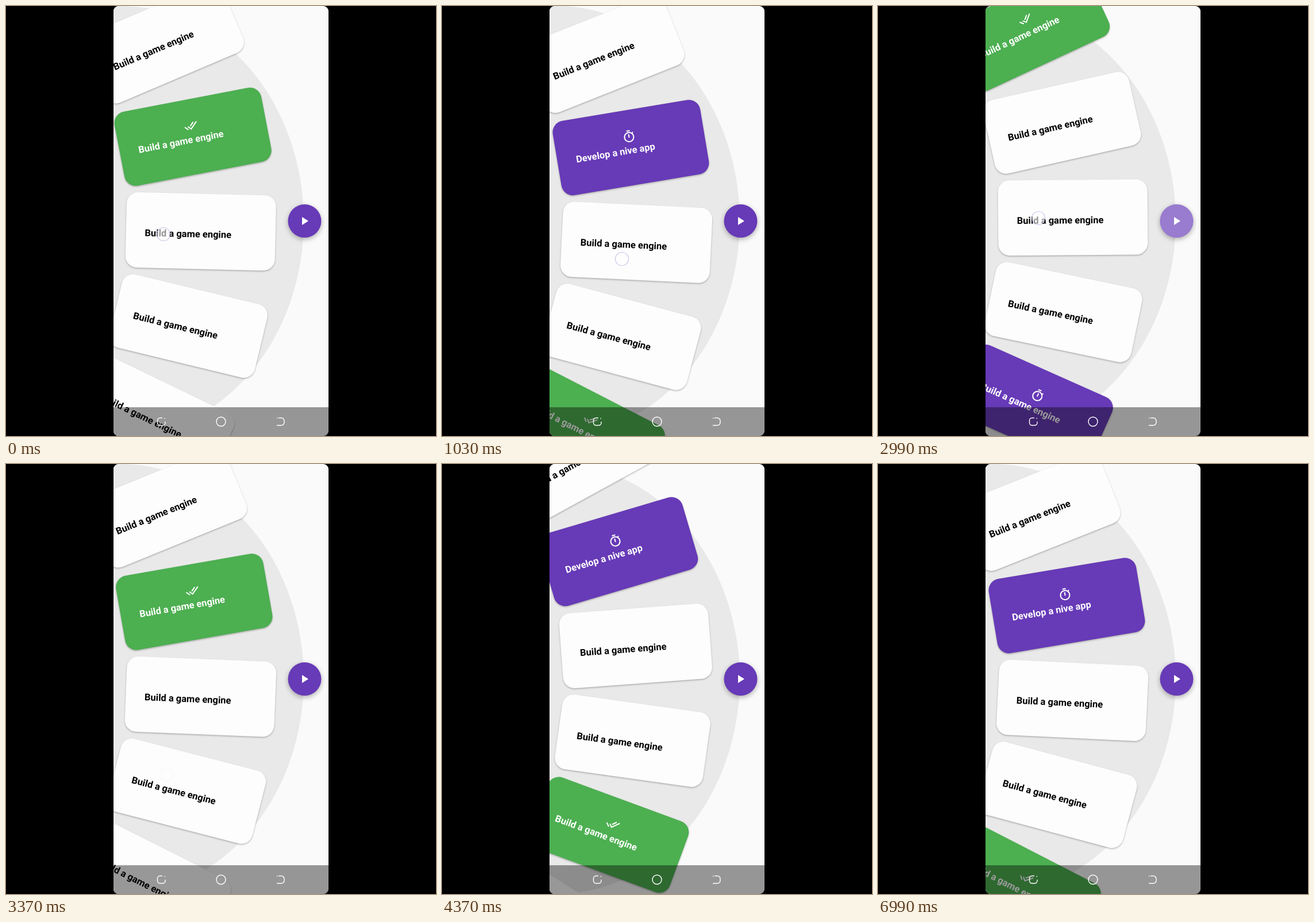
Write an HTML page with a canvas that moves like this. It is 748 px wide and 748 px high and loops after 7.97 s.

```html
<!DOCTYPE html>
<html lang="en">
<head>
<meta charset="utf-8">
<title>Task wheel</title>
<style>
  html, body { margin: 0; height: 100%; overflow: hidden; background: #000; }
  canvas { display: block; }
</style>
</head>
<body>
<canvas id="stage" width="748" height="748"></canvas>
<script>
const ctx = document.getElementById('stage').getContext('2d');
const LOOP = 7970, MID = 374, PITCH = 165, RADIUS = 780, TILT = 773, BEND = 1490;
const PURPLE = '#673ab7', GREEN = '#4caf50', WHITE = '#fdfdfd';

const DONE = new Path2D('M18 7l-1.4-1.4-6.35 6.33 1.41 1.41zM22.24 5.59L11.66 16.17 7.48 12l-1.41 1.41L11.66 19l12-12zM.41 13.41L6 19l1.41-1.41L1.83 12z');
const TIMER = new Path2D('M15 1H9v2h6zM11 14h2V8h-2zM19.03 7.39l1.42-1.42c-.43-.51-.9-.99-1.41-1.41l-1.42 1.42A9 9 0 1 0 19.03 7.39zM12 20a7 7 0 1 1 0-14 7 7 0 0 1 0 14z');
const PLAY = new Path2D('M515 367v14l11-7z');
const NAV = new Path2D('M272 716.5h-4a4.5 4.5 0 0 0-4.5 4.5v4a4.5 4.5 0 0 0 4.5 4.5h4.5a4.5 4.5 0 0 0 4.5-4.5v-2M275.5 717.5h1.5M382 723a8 8 0 1 1-16 0 8 8 0 0 1 16 0M474 716.5h5a5 5 0 0 1 5 5v3a5 5 0 0 1-5 5h-8M471 717h1.5');

const white = { fill: WHITE, ink: '#000', text: 'Build a game engine' };
const special = {
  2: { fill: PURPLE, ink: '#fff', text: 'Develop a nive app', icon: TIMER },
  5: { fill: GREEN, ink: '#fff', text: 'Build a game engine', icon: DONE },
  9: { fill: PURPLE, ink: '#fff', text: 'Build a game engine', icon: TIMER }
};

// Scroll position in cards: [time, position, power of the ease-out leading there]
const FLING = 1.775;
const scrollKeys = [
  [0, 5.89, 1], [20, 5.89, 1], [200, 4.6, 1], [680, 2.775, FLING],
  [1040, 2.775, 1], [1300, 4.11, 1], [2290, 7.037, FLING],
  [3000, 7.037, 1], [3300, 6, 1], [3720, 5.337, FLING],
  [3830, 5.337, 1], [4100, 4.1, 1], [4820, 2.775, FLING]
];
// Fingers on the screen: [down, up, x, y]
const drags = [[-50, 200, 274, 397], [850, 1300, 313, 440], [2940, 3300, 279, 369], [3760, 4100, 292, 389]];
const taps = [[2440, 2640, 530, 386], [4960, 5180, 530, 386]];

const clamp = v => Math.max(0, Math.min(1, v));

function scrollAt(t) {
  const i = scrollKeys.findIndex(k => k[0] > t);
  if (i < 0) return scrollKeys.at(-1)[1];
  const [t0, a] = scrollKeys[i - 1], [t1, b, power] = scrollKeys[i];
  return a + (b - a) * (1 - (1 - (t - t0) / (t1 - t0)) ** power);
}

function withShadow(alpha, blur, y, draw) {
  ctx.save();
  ctx.shadowColor = `rgba(0,0,0,${alpha})`;
  ctx.shadowBlur = blur;
  ctx.shadowOffsetY = y;
  draw();
  ctx.restore();
}

function disc(x, y, r, fill) {
  ctx.beginPath();
  ctx.arc(x, y, r, 0, 7);
  ctx.fillStyle = fill;
  ctx.fill();
}

function drawCard(index, scroll) {
  const along = (index - scroll) * PITCH;
  if (Math.abs(along) > 500) return;
  const dy = BEND * Math.sin(along / BEND);
  const { fill, ink, text, icon } = special[index] || white;
  ctx.save();
  ctx.translate(339 - RADIUS + Math.sqrt(RADIUS ** 2 - dy ** 2), MID + dy);
  ctx.rotate(along / TILT);
  ctx.beginPath();
  ctx.roundRect(-130, -65.5, 260, 131, 20);
  ctx.fillStyle = fill;
  withShadow(0.27, 3, 1.5, () => ctx.fill());
  ctx.fillStyle = ink;
  ctx.font = 'bold 16.5px Roboto, sans-serif';
  ctx.fillText(text, -97.3, 10.3);
  if (icon) {
    ctx.translate(-12, -31.5);
    ctx.fill(icon);
  }
  ctx.restore();
}

function drawButton(t) {
  withShadow(0.3, 8, 3, () => disc(519.5, MID, 29, PURPLE));
  for (const [down] of taps) {
    const age = t - down;
    const glow = 0.33 * clamp((age - 150) / 250) * clamp((800 - age) / 220);
    if (glow) disc(519.5, MID, 29, `rgba(255,255,255,${glow})`);
  }
  ctx.fillStyle = '#fff';
  ctx.fill(PLAY);
}

function drawTouch([down, up, x, y], t, moved) {
  if (t < down || t > up + 80) return;
  ctx.save();
  ctx.globalAlpha = clamp((t - down) / 40) * clamp((up + 80 - t) / 80);
  disc(x, y + moved, 11.5, 'rgba(255,255,255,.58)');
  ctx.strokeStyle = 'rgba(140,125,205,.45)';
  ctx.lineWidth = 1.2;
  ctx.stroke();
  ctx.restore();
}

function render(t) {
  const scroll = scrollAt(t);
  ctx.fillStyle = '#000';
  ctx.fillRect(0, 0, 748, 748);
  ctx.save();
  ctx.beginPath();
  ctx.roundRect(187, 0, 374, 748, 9);
  ctx.clip();
  ctx.fillStyle = '#fafafa';
  ctx.fillRect(187, 0, 374, 748);
  ctx.beginPath();
  ctx.ellipse(200, MID, 318, 374, 0, 0, 7);
  ctx.fillStyle = '#e9e9e9';
  ctx.fill();

  for (let i = 1; i <= 9; i++) drawCard(i, scroll);
  drawButton(t);

  ctx.fillStyle = 'rgba(0,0,0,.4)';
  ctx.fillRect(187, 698, 374, 50);
  ctx.strokeStyle = '#fff';
  ctx.lineWidth = 1.4;
  ctx.stroke(NAV);

  // A dragging finger moves with the cards it pulls
  for (const drag of drags) {
    const from = scrollAt(Math.max(0, drag[0]));
    const now = scrollAt(Math.min(t, drag[1]));
    drawTouch(drag, t, (from - now) * PITCH);
  }
  for (const tap of taps) drawTouch(tap, t, 0);
  ctx.restore();
}

const start = performance.now();
function tick() {
  render((performance.now() - start) % LOOP);
  requestAnimationFrame(tick);
}
tick();
</script>
</body>
</html>
```
